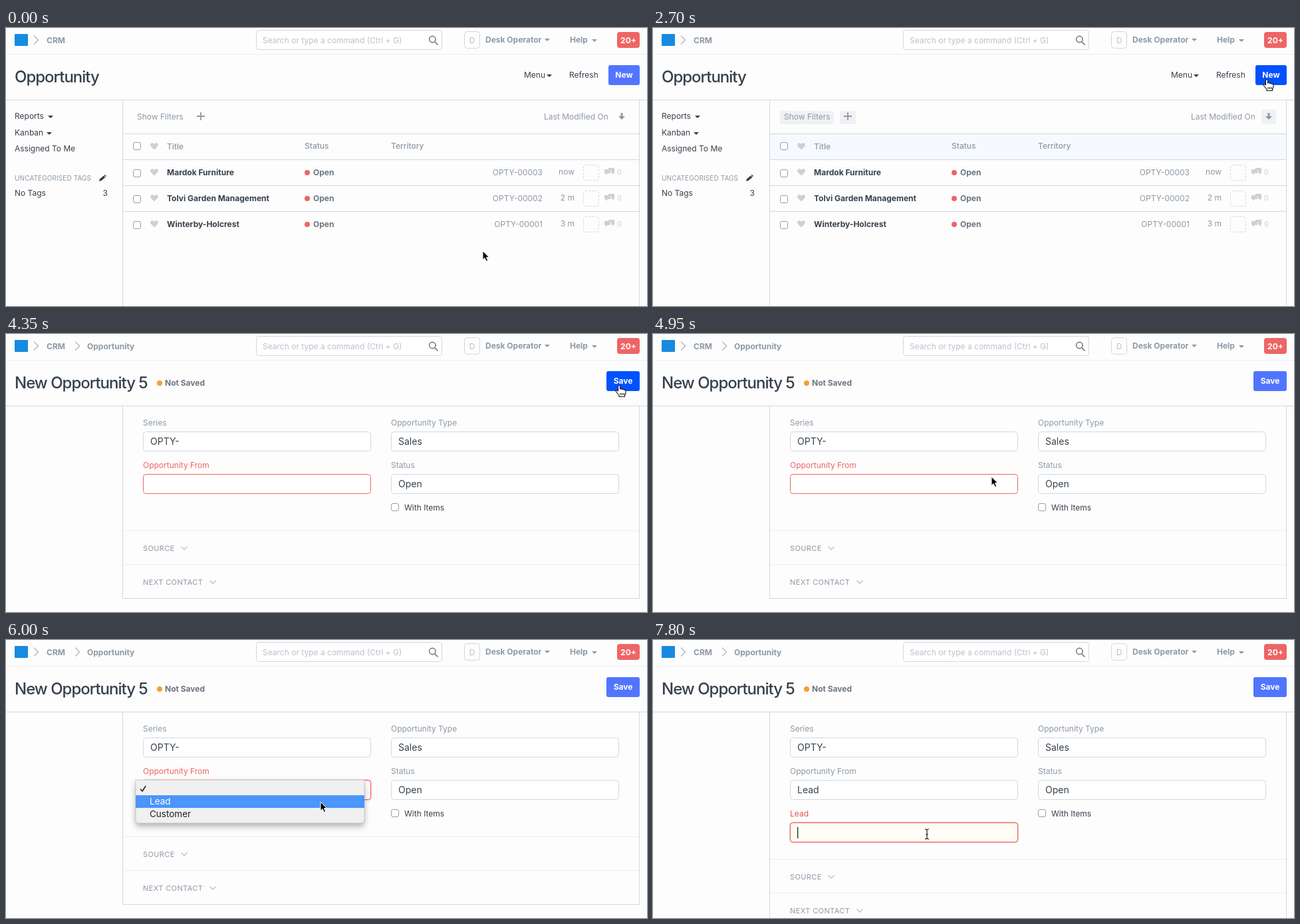
Animation of 964x419 px, one loop 8000 ms. Source, as an HTML page:

```html
<!DOCTYPE html>
<html lang="en">
<head>
<meta charset="utf-8">
<title>CRM opportunity form</title>
<style>
  html, body { margin: 0; width: 100%; height: 100%; overflow: hidden; background: #fdfdfd; }
  svg { display: block; width: 964px; height: 419px; font: 12px Inter, sans-serif; }
  text { white-space: pre; }
  .bold { font-weight: 700; }
  .mid { font-weight: 500; }
  .title { font-size: 24px; font-weight: 500; letter-spacing: -1px; }
  .value { font-size: 14px; }
  .option { font-size: 13.5px; }
  .section { font-size: 11px; letter-spacing: .4px; }
  .tags { font-size: 10px; letter-spacing: .1px; }
  .small { font-size: 11px; }
  .menu { filter: drop-shadow(0 5px 4px rgba(0, 0, 0, .28)); }
</style>
</head>
<body>
<svg id="stage" viewBox="0 0 964 419"></svg>
<script>
const LOOP = 8000, STEP = 150;
const INK = '#36414c', GREY = '#8d99a6', PALE = '#cbd1d7', LINE = '#d1d8dd', SOFT = '#ebeef1';
const RED = '#ee6565', BLUE = '#5175ff', DEEP = '#0052ff';

// Pointer waypoints: time, x, y
const PATH = [
  [0, 717, 336], [1200, 717, 336], [2250, 924, 79], [2400, 923, 78], [2700, 923, 77],
  [4350, 922, 77], [4650, 535, 150], [4950, 509, 215], [5400, 509, 215], [5700, 480, 246],
  [5850, 473, 250], [6000, 473, 244], [6300, 473, 244], [6750, 468, 248], [7350, 412, 292]
];

const text = (x, y, s, fill = GREY, cls = '', anchor = 'start') =>
  `<text x="${x}" y="${y}" fill="${fill}" class="${cls}" text-anchor="${anchor}">${s}</text>`;
const rect = (x, y, w, h, fill, r = 0, stroke = 'none', extra = '') =>
  `<rect x="${x}" y="${y}" width="${w}" height="${h}" rx="${r}" fill="${fill}" stroke="${stroke}" ${extra}/>`;
const box = (x, y, w, h, stroke, r, fill = 'none', extra = '') =>
  rect(x + .5, y + .5, w - 1, h - 1, fill, r, stroke, extra);
const path = (x, y, d, fill, stroke = 'none', width = 1) =>
  `<path transform="translate(${x} ${y})" d="${d}" fill="${fill}" stroke="${stroke}" stroke-width="${width}" stroke-linejoin="round"/>`;
const hline = (x, y, w, color = LINE) => rect(x, y, w, 1, color);
const vline = (x, y, h, color = LINE) => rect(x, y, 1, h, color);
const dot = (x, y, fill) => `<circle cx="${x}" cy="${y}" r="4" fill="${fill}"/>`;
const caret = (x, y, fill) => path(x, y, 'M-4 -2h8l-4 4z', fill);
const chevron = x => path(x, 18, 'M-3 -6.5L3.5 0L-3 6.5', 'none', '#b3bcc6', 1.6);
const checkbox = (x, y) => box(x, y, 12, 12, '#999fa5', 2.5, '#fff');
const heart = (x, y) => path(x, y, 'M0 5.5L-5 .6C-8-3-3-7 0-3C3-7 8-3 5 .6z', PALE);

function button(right, label, width, hot) {
  const x = right - width;
  return rect(x, 56, width, 30, hot ? DEEP : BLUE, 3) +
    text(x + width / 2, 75, label, '#fff', 'bold', 'middle');
}

function navbar(inForm) {
  return rect(13, 9, 20, 18, '#178be0', 1) + chevron(45) + text(61, 22.5, 'CRM', GREY, 'bold') +
    (inForm ? chevron(107) + text(122, 22.5, 'Opportunity', GREY, 'bold') : '') +
    box(376, 3, 280, 30, LINE, 3, '#fff') +
    text(386, 23, 'Search or type a command (Ctrl + G)', '#b8c2cc') +
    path(642, 18, 'M3 3L7.500 7.500M4-1A4.700 4.700 0 1 1-5.400-1A4.700 4.700 0 1 1 4-1', 'none', '#687078', 1.5) +
    box(689, 5, 24, 26, LINE, 4) + text(701, 22.5, 'D', '#b8c2cc', '', 'middle') +
    text(721, 22, 'Desk Operator', GREY, 'bold') + caret(814, 18, GREY) +
    text(848, 22, 'Help', GREY, 'bold') + caret(885, 19, GREY) +
    rect(919, 6, 34, 24, RED, 4) + text(936, 22.5, '20+', '#fff', 'bold', 'middle') +
    hline(0, 39, 964, SOFT) + hline(0, 108, 964);
}

function sidebar() {
  return text(13, 137, 'Reports', INK) + caret(67, 134, INK) +
    text(13, 162, 'Kanban', INK) + caret(65, 159, INK) +
    text(13, 186, 'Assigned To Me', INK) +
    text(13, 230, 'UNCATEGORISED TAGS', GREY, 'tags') +
    path(145, 226, 'M-5 5l1-3.500L2-3.500l2.500 2.500L-1.500 4zM2.700-4.200l1-1L6-2.700l-1 1z', INK) +
    text(13, 253, 'No Tags', INK) + text(153, 253, '3', INK, '', 'end');
}

function row(name, id, age, i) {
  const y = 198 + i * 39;
  return checkbox(191, y + 15) + heart(223, y + 19) +
    text(242, y + 24, name, INK, 'bold') +
    dot(453, y + 20, RED) + text(462, y + 24, 'Open', '#6c7680', 'bold') +
    text(807, y + 24, id, GREY, '', 'end') + text(855, y + 23, age, GREY, '', 'end') +
    box(868, y + 8, 24, 24, LINE, 3, 'none', 'stroke-dasharray="3 2"') +
    path(900, y + 13, 'M6 0h9v7h-1v3l-3-3h-1V3H6z', PALE) +
    path(900, y + 13, 'M0 2h9v6H5l-3 3V8H0z', PALE) +
    text(919, y + 23, '0', PALE, 'small') + (i ? hline(176, y, 776) : '');
}

function list(t, hot) {
  const tint = '#f0f1f4';
  return text(13, 82, 'Opportunity', INK, 'title') +
    text(779, 75, 'Menu', INK) + caret(817, 72, INK) + text(847, 75, 'Refresh', INK) +
    button(953, 'New', 47, hot) + sidebar() +
    (t >= 1800 ? rect(176, 160, 776, 38, '#f6faff') : '') +
    (t >= 1950 ? rect(191, 125, 81, 20, tint, 2) + rect(281, 125, 24, 20, tint, 2) + rect(915, 123, 22, 22, tint, 2) : '') +
    text(197, 138, 'Show Filters') +
    path(293, 133, 'M-6 0H6M0-6V6', 'none', GREY, 1.8) +
    text(809, 138, 'Last Modified On') +
    path(926, 133, 'M-1.500-5h3V0H5L0 5L-5 0h3.500z', GREY) +
    vline(175, 108, 311) + vline(952, 108, 311) + hline(176, 159, 776) + hline(176, 198, 776) +
    checkbox(191, 172) + heart(223, 178) +
    text(242, 182.5, 'Title', GREY, 'mid') + text(449, 182, 'Status', GREY, 'mid') +
    text(579, 182, 'Territory', GREY, 'mid') +
    row('Mardok Furniture', 'OPTY-00003', 'now', 0) +
    row('Tolvi Garden Management', 'OPTY-00002', '2 m', 1) +
    row('Winterby-Holcrest', 'OPTY-00001', '3 m', 2);
}

function field(x, y, label, value, { color = GREY, stroke = LINE, fill = '#fff', focus = false } = {}) {
  return text(x, y - 9, label, color) +
    (focus ? box(x - 1, y - 1, 345, 32, '#ee656540', 5, 'none', 'stroke-width="2"') : '') +
    box(x, y, 343, 30, focus ? '#ec5350' : stroke, 4, fill) +
    text(x + 11, y + 20, value, INK, 'value');
}

function section(y, label, tipX) {
  return hline(176, y, 776, SOFT) + text(206, y + 31, label, GREY, 'section') +
    path(tipX, y + 27, 'M-4.500-2.500L0 2L4.500-2.500', 'none', '#b8c2cc', 1.4);
}

function dropdown(picked) {
  const shade = i => picked === i ? rect(195, 215 + i * 19, 344, 19, '#4b95fb') : '';
  const ink = i => picked === i ? '#fff' : '#222';
  return '<g class="menu">' + path(195, 211, 'M0 0H344V60Q344 65 339 65H5Q0 65 0 60z', '#f0f0f0', '#b9b9b9', .7) + '</g>' +
    shade(0) + shade(1) + path(206, 224, 'M-4 .500L-1 4L4-4', 'none', ink(0), 1.6) +
    text(216, 248, 'Lead', ink(1), 'option') + text(216, 267, 'Customer', ink(2), 'option');
}

function form(t, hot, y) {
  const chosen = t >= 6600, open = t >= 5100 && !chosen, typing = t >= 7500;
  const shift = chosen ? 34 : 0, bottom = 398 + shift;
  let picked = -1;
  if (t >= 5550 && t < 6450) picked = y < 234 ? 0 : 1;
  return text(13, 82, 'New Opportunity 5', INK, 'title') +
    dot(231, 74, '#f7a02e') + text(239, 78, 'Not Saved', '#6c7680', 'bold') +
    button(953, 'Save', 50, hot) +
    vline(175, 108, bottom - 108) + vline(952, 108, bottom - 108) + hline(175, bottom, 778) +
    field(206, 147, 'Series', 'OPTY-') + field(579, 147, 'Opportunity Type', 'Sales') +
    field(206, 211, 'Opportunity From', chosen ? 'Lead' : '', {
      color: chosen ? GREY : RED, stroke: chosen ? LINE : RED, focus: t >= 5100 && !typing
    }) +
    field(579, 211, 'Status', 'Open') +
    checkbox(579, 255) + text(599, 266, 'With Items', INK) +
    (chosen ? field(206, 275, 'Lead', '', {
      color: '#e85252', stroke: '#d8bbaa', fill: typing ? '#fffdf5' : '#fffef0', focus: typing
    }) : '') +
    (typing ? rect(217, 282, 1.3, 17, '#222') : '') +
    section(296 + shift, 'SOURCE', 268) + section(347 + shift, 'NEXT CONTACT', 311) +
    (open ? dropdown(picked) : '');
}

function pointerAt(t) {
  const i = PATH.findIndex(p => p[0] > t);
  if (i < 0) return PATH[PATH.length - 1].slice(1);
  const [a, ax, ay] = PATH[i - 1], [b, bx, by] = PATH[i];
  const k = (t - a) / (b - a), e = k * k * (3 - 2 * k);
  return [ax + (bx - ax) * e, ay + (by - ay) * e];
}

function pointer(t, x, y, hot) {
  if (hot) return path(x, y,
    'M-1.500 1.500Q0-1 1.500 1.500V6Q3.500 4.700 4.700 6.500Q6.500 5.500 7.500 7.300Q10 6.500 10 9V12Q9.500 14 8.500 15V17.500H0V15.500Q-3 12-5 9Q-4.500 6.500-1.500 9z' +
    'M2 12v3M4.500 12v3M7 12v3', '#fff', '#111', 1.1);
  if (t > 6600 && y >= 275) return path(x, y,
    'M-3-7Q0-7 0-5Q0-7 3-7M0-5V6M-3 8Q0 8 0 6Q0 8 3 8M-2 1H2', 'none', '#222', 1.2);
  return path(x, y, 'M0 0V13.500L3 10.600L5.300 15.500L7.600 14.500L5.400 9.700H9.500z', '#000', '#fff', 1);
}

function scene(t) {
  const [x, y] = pointerAt(t), inForm = t >= 3900, hot = y < 87 && x >= 903;
  return rect(0, 0, 964, 419, '#fdfdfd') + navbar(inForm) +
    (inForm ? form(t, hot, y) : list(t, hot)) + pointer(t, x, y, hot);
}

const stage = document.getElementById('stage');
let shown = -1;
function draw() {
  const step = Math.floor(performance.now() % LOOP / STEP);
  if (step !== shown) {
    shown = step;
    stage.innerHTML = scene(step * STEP);
  }
  requestAnimationFrame(draw);
}
draw();
</script>
</body>
</html>
```
